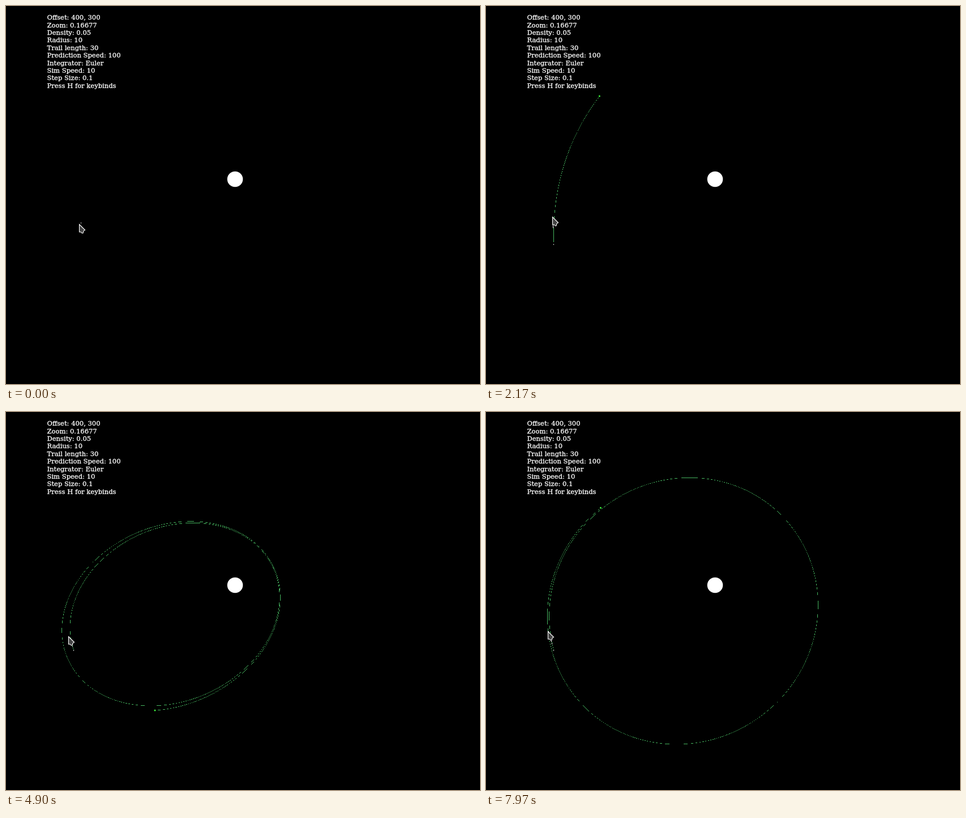
Write an HTML page with a canvas that moves like this. It is 837 px wide and 669 px high and loops after 8 s.

```html
<!DOCTYPE html>
<html lang="en">
<head>
<meta charset="utf-8">
<title>Orbit prediction</title>
<style>
  html, body { margin: 0; width: 100%; height: 100%; overflow: hidden; background: #000; }
  canvas { display: block; }
</style>
</head>
<body>
<canvas id="stage" width="837" height="669"></canvas>
<script>
const ctx = document.getElementById('stage').getContext('2d');

const LOOP = 8000;
const SUN = { x: 404.5, y: 306.5, radius: 13.8 };
const BODY = { x: 119.65, y: 422 };
const GRAVITY = 191.5;      // px^3 / ms^2
const LAUNCH = 0.01898;     // launch speed per pixel of drag
const STEP = 1 / 6;         // integration step in ms
const PRESS = 680;          // the drag begins here
const STUB = 25;            // age of the prediction while the pointer moves

const LABELS = [
  'Offset: 400, 300', 'Zoom: 0.16677', 'Density: 0.05', 'Radius: 10',
  'Trail length: 30', 'Prediction Speed: 100', 'Integrator: Euler',
  'Sim Speed: 10', 'Step Size: 0.1', 'Press H for keybinds'
];

// The pointer rests between moves; each move ends at x, y.
const MOVES = [
  { start: 0, end: 0, x: 129.6, y: 386 },
  { start: 0, end: 450, x: 119.65, y: 422 },
  { start: PRESS, end: 1097, x: 89.5, y: 360 },
  { start: 1460, end: 1893, x: 117.75, y: 373.3 },
  { start: 2515, end: 2742, x: 111.11, y: 397.6 },
  { start: 5785, end: 5881, x: 110.17, y: 387.9 }
];

const CURSOR = new Path2D('M0 0 L10 10 L7.5 11.5 L6.5 15.5 L4.5 15.5 L3 13.5 L0 13.5 Z');

const mix = (a, b, u) => a + (b - a) * u;
const ease = u => u * u * (3 - 2 * u);

function pointerAt(t) {
  let i = MOVES.length - 1;
  while (i > 0 && MOVES[i].start > t) i--;
  const move = MOVES[i], from = MOVES[Math.max(0, i - 1)];
  if (t >= move.end) return { x: move.x, y: move.y, age: t - move.end };
  const u = ease((t - move.start) / (move.end - move.start));
  return {
    x: mix(from.x, move.x, u),
    y: mix(from.y, move.y, u),
    age: Math.min(STUB, t - move.start)
  };
}

// Thin aliased line on a doubled grid, of which every second row and column shows.
function thinLine(color) {
  let lastX, lastY;
  return (x, y, dx, dy) => {
    const gx = Math.floor(2 * x), gy = Math.floor(2 * y);
    const advanced = Math.abs(dx) > Math.abs(dy) ? gx !== lastX : gy !== lastY;
    if (!advanced) return;
    lastX = gx;
    lastY = gy;
    if (gx % 2 || gy % 2) return;
    ctx.fillStyle = color;
    ctx.fillRect(gx / 2, gy / 2, 1, 1);
  };
}

function drawPrediction(pointer) {
  const plot = thinLine('#45b45e');
  let { x, y } = BODY;
  let vx = LAUNCH * (pointer.x - x), vy = LAUNCH * (pointer.y - y);
  for (let n = Math.floor(pointer.age / STEP); n > 0; n--) {
    plot(x, y, vx, vy);
    const rx = SUN.x - x, ry = SUN.y - y;
    const pull = STEP * GRAVITY / Math.hypot(rx, ry) ** 3;
    x += STEP * vx;
    y += STEP * vy;
    vx += pull * rx;
    vy += pull * ry;
  }
  ctx.fillStyle = '#3cf03c';
  ctx.beginPath();
  ctx.arc(x, y, 1.5, 0, 7);
  ctx.fill();
}

function drawDragLine(pointer) {
  const plot = thinLine('#fff');
  const dx = pointer.x - BODY.x, dy = pointer.y - BODY.y;
  const count = Math.ceil(4 * Math.hypot(dx, dy));
  for (let i = 0; i < count; i++) {
    plot(BODY.x + dx * i / count, BODY.y + dy * i / count, dx, dy);
  }
}

function drawBody(t) {
  const u = ease(Math.min(1, t / 480));
  ctx.fillStyle = '#ccc';
  ctx.fillRect(Math.floor(mix(133, BODY.x, u)), Math.floor(mix(383, BODY.y - 1, u)), 1, 2);
}

function drawCursor(pointer) {
  ctx.save();
  ctx.translate(Math.round(pointer.x - 0.8) + 0.5, Math.round(pointer.y - 0.2) + 0.5);
  ctx.fillStyle = '#444';
  ctx.strokeStyle = '#fff';
  ctx.lineWidth = 1.1;
  ctx.fill(CURSOR);
  ctx.stroke(CURSOR);
  ctx.restore();
}

function drawLabels() {
  ctx.font = '11.55px "DejaVu Serif", serif';
  ctx.fillStyle = ctx.strokeStyle = '#fff';
  ctx.lineWidth = 0.3;
  LABELS.forEach((label, i) => {
    const baseline = Math.round(24.4 + 13.36 * i);
    ctx.fillText(label, 72.5, baseline);
    ctx.strokeText(label, 72.5, baseline);
  });
}

function drawScene() {
  ctx.fillStyle = '#000';
  ctx.fillRect(0, 0, 837, 669);
  ctx.fillStyle = '#fff';
  ctx.beginPath();
  ctx.arc(SUN.x, SUN.y, SUN.radius, 0, 7);
  ctx.fill();
  drawLabels();
}

function render(now) {
  const t = now % LOOP;
  const pointer = pointerAt(t);
  drawScene();
  if (t > PRESS) {
    drawDragLine(pointer);
    drawPrediction(pointer);
  }
  drawBody(t);
  drawCursor(pointer);
}

const began = performance.now();
function tick() {
  render(performance.now() - began);
  requestAnimationFrame(tick);
}
tick();
</script>
</body>
</html>
```
